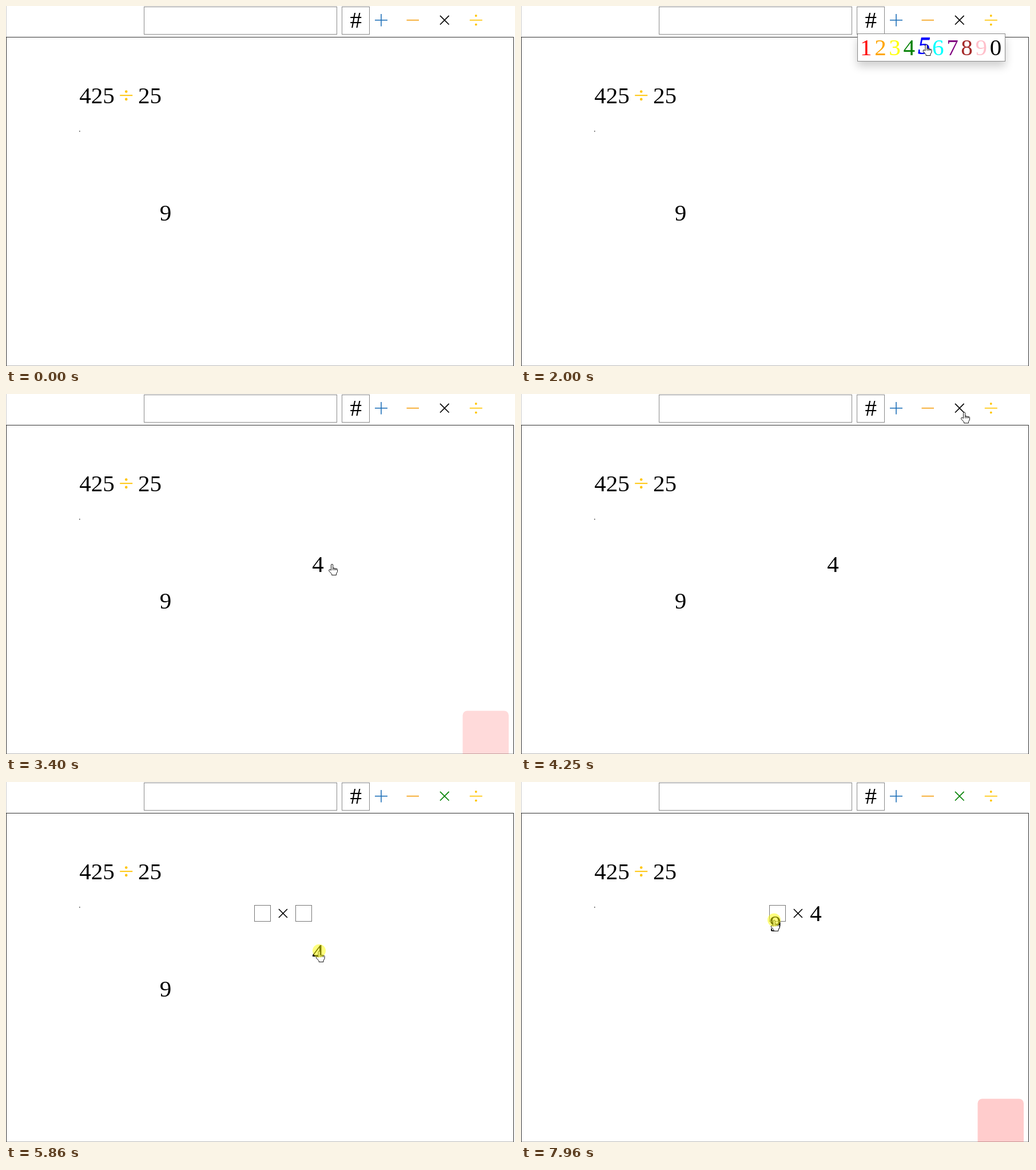
Animation, 890 px wide and 629 px high, one loop 8 s. Source, as an HTML page with a canvas:

```html
<!DOCTYPE html>
<html lang="en">
<head>
<meta charset="utf-8">
<title>Number board</title>
<style>
  html, body { margin: 0; width: 100%; height: 100%; overflow: hidden; background: #fff; }
  canvas { display: block; }
</style>
</head>
<body>
<canvas id="stage" width="890" height="629"></canvas>
<script>
const ctx = document.getElementById('stage').getContext('2d');
const LOOP = 8000;
const SERIF = '"Liberation Serif", "Times New Roman", serif';
const GRAY = '#8a8a8a', YELLOW = '#ffc60c', GREEN = '#008000';
const DIGIT_COLORS = ['red', 'orange', 'yellow', 'green', 'blue', 'cyan', 'purple', 'brown', 'pink', 'black'];

// Each move is [start, end, x, y]; the position holds between moves.
const pointerMoves = [
  [0, 0, 640, 121],
  [380, 990, 618, 38],
  [1100, 1770, 716, 66],
  [1870, 2380, 686.5, 70.5],
  [2660, 2860, 555, 298],
  [2860, 3090, 553.5, 303.5],
  [3330, 3400, 570, 297],
  [3500, 4100, 775, 31.5],
  [4250, 4400, 769, 29],
  [4580, 5020, 536, 241],
  [5020, 5100, 517, 231],
  [5100, 5220, 490, 232],
  [5440, 5780, 547.5, 295],
  [5890, 6400, 526, 229],
  [6560, 6640, 523, 231],
  [6980, 7460, 276.5, 355],
  [7610, 7740, 355, 283],
  [7740, 7810, 412, 256],
  [7810, 7960, 442.5, 241]
];
const fourMoves = [[0, 0, 678.5, 72], [2660, 2860, 550, 287], [2860, 3090, 545.5, 297]];
const drags = [
  { press: 2550, start: 2700, release: 3330 },
  { press: 4420, start: 4600, release: 5360 },
  { press: 5840, start: 5900, release: 6560 },
  { press: 7520, start: 7610, release: 9000 }
];

function along(moves, t) {
  let x = 0, y = 0;
  for (const [start, end, toX, toY] of moves) {
    if (t < start) break;
    const k = Math.min(1, (t - start) / (end - start || 1));
    const done = t >= end ? 1 : k;
    x += (toX - x) * done;
    y += (toY - y) * done;
  }
  return { x, y };
}

function line(color, width, x0, y0, x1, y1) {
  ctx.strokeStyle = color;
  ctx.lineWidth = width;
  ctx.beginPath();
  ctx.moveTo(x0, y0);
  ctx.lineTo(x1, y1);
  ctx.stroke();
}

function frame(color, x, y, w, h) {
  ctx.strokeStyle = color;
  ctx.lineWidth = 1;
  ctx.strokeRect(x + 0.5, y + 0.5, w, h);
}

function disc(color, x, y, r) {
  ctx.fillStyle = color;
  ctx.beginPath();
  ctx.arc(x, y, r, 0, Math.PI * 2);
  ctx.fill();
}

function text(str, x, y, color = '#000', style = '', size = 41) {
  ctx.font = `${style} ${size}px ${SERIF}`;
  ctx.textAlign = 'center';
  ctx.fillStyle = color;
  ctx.fillText(str, x, y + 13.5);
}

function times(x, y, r, color) {
  line(color, 1.7, x - r, y - r, x + r, y + r);
  line(color, 1.7, x - r, y + r, x + r, y - r);
}

function divide(x, y, gap, r, width) {
  line(YELLOW, width, x - 11, y, x + 11, y);
  disc(YELLOW, x, y - gap, r);
  disc(YELLOW, x, y + gap, r);
}

function drawBoard(t) {
  line('#ccc', 1, 0.5, 0, 0.5, 54);
  frame(GRAY, 241, 1, 337, 48);
  frame(GRAY, 587, 1, 48, 48);
  frame('#333', 0, 54, 887, 600);
  line('#bbb', 1, 1, 628.5, 887, 628.5);

  text('#', 611.7, 24.5);
  line('#1d6fb8', 1.6, 645, 24.7, 667, 24.7);
  line('#1d6fb8', 1.6, 656, 14, 656, 35.5);
  line('#f5a31a', 1.7, 700.5, 24.7, 722, 24.7);
  times(766.8, 24.7, 7.8, t < 4420 ? '#000' : GREEN);
  divide(821.8, 24.7, 7.7, 1.9, 1.7);

  text('425', 159, 156.5);
  divide(210.2, 156.2, 6.7, 2.3, 2);
  text('25', 251.6, 156.5);
  ctx.fillStyle = '#333';
  ctx.fillRect(128, 218, 1.5, 1.5);
}

function drawPalette(p) {
  ctx.save();
  ctx.shadowColor = 'rgba(0,0,0,.2)';
  ctx.shadowBlur = 16;
  ctx.shadowOffsetY = 8;
  ctx.fillStyle = '#fff';
  ctx.fillRect(588, 49, 259, 48);
  ctx.restore();
  frame(GRAY, 588, 48, 258, 48);
  const hovered = p.y > 49 ? Math.floor((p.x - 590.5) / 25.2) : -1;
  DIGIT_COLORS.forEach((color, i) => {
    const x = 603.2 + 25.2 * i, digit = (i + 1) % 10;
    if (i === hovered) text(digit, x + 1, 70.5, color, 'italic bold', 45);
    else text(digit, x, 72.5, color);
  });
}

function drawPieces(t, p) {
  if (t < 7610) text('9', 279, 361.5);
  else text('9', p.x + 2.5, p.y + 6);

  if (t >= 4600 && t < 5360) times(p.x + 0.8, p.y - 4, 7.5, GREEN);
  if (t >= 5360) {
    frame('#777', 434, 215, 28, 28);
    times(484.4, 229.5, 7.5, '#000');
    if (t < 6560) frame('#777', 506, 215, 28, 28);
  }

  if (t >= 6560) text('4', 515.6, 229.5);
  else if (t >= 5900) text('4', p.x - 2, p.y + 2);
  else if (t >= 2700) {
    const four = along(fourMoves, t);
    text('4', four.x, four.y);
  }
}

function drawTrash(t) {
  const fade = 250;
  const levels = drags.map(d => Math.min(1, (t - d.start) / fade, 1 - (t - d.release) / fade));
  const level = Math.max(0, ...levels);
  ctx.fillStyle = `rgba(255,0,0,${0.2 * level})`;
  ctx.beginPath();
  ctx.roundRect(798.5, 553.5, 80.5, 90, 8);
  ctx.fill();
}

function drawPointer(p, pressed) {
  ctx.save();
  ctx.translate(p.x, p.y);
  ctx.fillStyle = '#fff';
  ctx.beginPath();
  ctx.moveTo(-1.5, 11);
  ctx.lineTo(-1.5, 2);
  ctx.arc(0.1, 2, 1.6, Math.PI, 0);
  for (let i = 0; i < 3; i++) ctx.arc(3 + 2.6 * i, 8.2 + 0.7 * i, 1.3, Math.PI, 0);
  ctx.lineTo(9.5, 13.5);
  ctx.lineTo(7.5, 17);
  ctx.lineTo(7.5, 19.4);
  ctx.lineTo(-0.4, 19.4);
  ctx.lineTo(-0.4, 17.5);
  ctx.lineTo(-5.4, 12);
  ctx.quadraticCurveTo(-5.2, 8.5, -3.2, 9.9);
  ctx.closePath();
  ctx.fill();
  ctx.strokeStyle = '#111';
  ctx.lineWidth = 1;
  ctx.stroke();
  for (let i = 0; i < 3; i++) line('#111', 1, 1.7 + 2.6 * i, 8, 1.7 + 2.6 * i, 11);
  ctx.restore();
  if (pressed) disc('rgba(255,255,0,.5)', p.x, p.y, 11.5);
}

function draw(t) {
  const p = along(pointerMoves, t);
  ctx.fillStyle = '#fff';
  ctx.fillRect(0, 0, 890, 629);
  drawBoard(t);
  drawPieces(t, p);
  drawTrash(t);
  if (t >= 800 && t < 2700) drawPalette(p);
  if (t >= 380) drawPointer(p, drags.some(d => t >= d.press && t < d.release));
}

const begin = performance.now();
function tick() {
  draw(Math.max(0, performance.now() - begin) % LOOP);
  requestAnimationFrame(tick);
}
tick();
</script>
</body>
</html>
```
